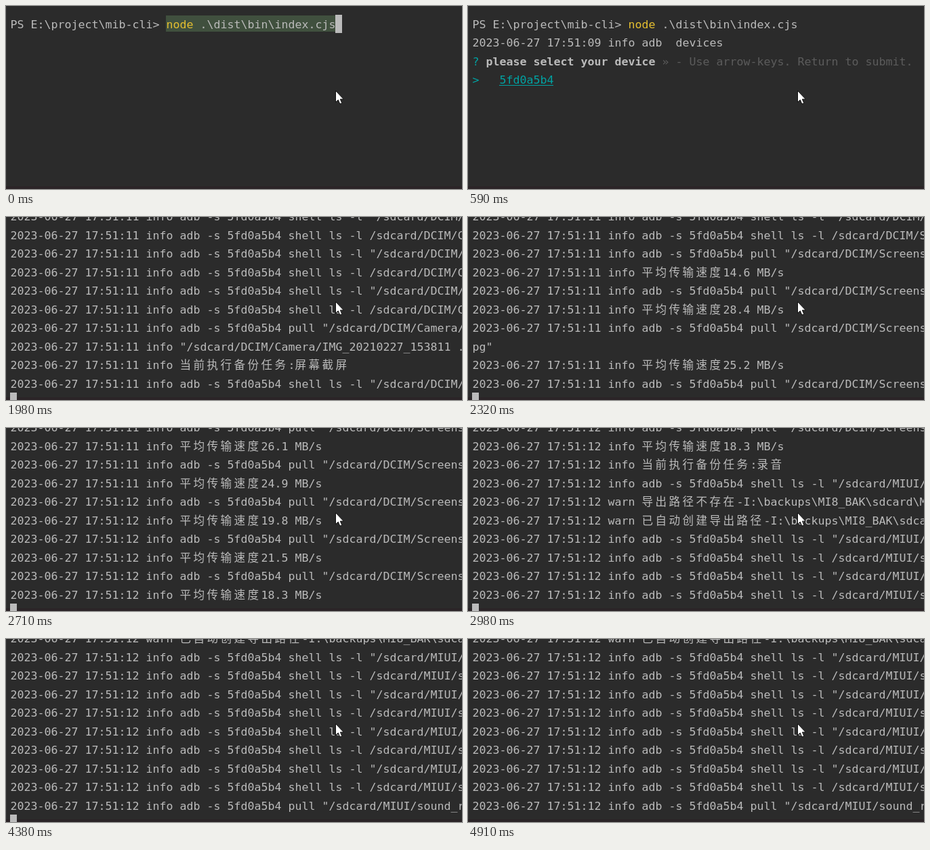
Write an HTML page with a canvas that moves like this. It is 673 by 271 pixels and loops after 5370 ms.

```html
<!DOCTYPE html>
<html lang="zh">
<head>
<meta charset="utf-8">
<style>
  html, body { margin: 0; width: 100%; height: 100%; overflow: hidden; background: #2b2b2b; }
  canvas { display: block; }
</style>
</head>
<body>
<canvas id="stage" width="673" height="271"></canvas>
<script>
const ctx = document.getElementById('stage').getContext('2d');
const LOOP = 5370, CELL = 10, PITCH = 27.5, LEFT = 6, TOP = 13, ROWS = 9;
const GREY = '#bbbbbb', DIM = '#5c5c5c', YELLOW = '#e5bf30', CYAN = '#00a3a3', GREEN = '#6f7040';
const MONO = '16.6px "DejaVu Sans Mono", monospace';
const HAN = '300 16.6px "Noto Sans CJK SC", "Noto Sans CJK", sans-serif';

// A line is a list of [text, colour, bold] segments.
const lines = [];
const add = (...segments) => lines.push(segments);
const log = (text, level = 'info') => {
  const n = lines.length;
  const second = n < 3 ? '09' : n < 4 ? '10' : n < 37 ? '11' : '12';
  add([`2023-06-27 17:51:${second} ${level} ${text}`]);
};
const adb = command => log('adb -s 5fd0a5b4 ' + command);
const list = path => adb('shell ls -l ' + path);
const listPairs = (path, count) => {
  while (count--) { list(`"${path}"`); list(path); }
};
const pull = path => adb(`pull "${path}/`);
const task = name => log('当前执行备份任务:' + name);
const speed = rate => log(`平均传输速度${rate} MB/s`);

const camera = '/sdcard/DCIM/Camera', shots = '/sdcard/DCIM/Screenshots', sound = '/sdcard/MIUI/sound_recorder';
const question = 'please select your device';

add(['PS E:\\project\\mib-cli> '], ['node', YELLOW], [' .\\dist\\bin\\index.cjs']);
log('adb  devices');
add(['√ ', GREEN], [question, GREY, true], [' » ', DIM], ['5fd0a5b4']);
log('adb  devices');
task('本地相册');
listPairs(camera, 5);
pull(camera);
log(`"${camera}/IMG_20210227_153811 .jpg"`);
task('屏幕截屏');
listPairs(shots, 3);
for (const rate of ['14.6', '28.4', '25.2', '22.7', '26.1', '24.9', '19.8', '21.5', '18.3']) {
  pull(shots);
  if (rate === '25.2') add(['pg"']);
  speed(rate);
}
task('录音');
list(`"${sound}"`);
log('导出路径不存在-I:\\backups\\MI8_BAK\\sdcard\\MIUI', 'warn');
log('已自动创建导出路径-I:\\backups\\MI8_BAK\\sdcard\\MIUI', 'warn');
listPairs(sound, 4);
pull(sound);

const menu = [
  [['? ', CYAN], [question, GREY, true], [' » - Use arrow-keys. Return to submit.', DIM]],
  [['>   5fd0a5b4', CYAN]]
];

// [time, number of lines printed]
const steps = [
  [0, 1], [260, 1], [390, 2], [1510, 6], [1580, 8], [1710, 10], [1780, 13], [1910, 15], [1980, 19],
  [2110, 21], [2180, 24], [2250, 28], [2320, 32], [2450, 36], [2500, 40],
  [2640, 42], [2710, 43], [2840, 46], [2910, 48], [2980, 51],
  [3040, 52], [3110, 53], [3240, 54], [3310, 56]
];

const rowTop = row => Math.floor(TOP + row * PITCH);

function rect(colour, x, y, w, h) {
  ctx.fillStyle = colour;
  ctx.fillRect(x, y, w, h);
}

function drawLine(segments, row) {
  let x = LEFT + 0.5;
  for (const [text, colour = GREY, bold] of segments) {
    ctx.fillStyle = colour;
    for (const char of text) {
      const wide = char > '\u2e80';
      ctx.font = wide ? HAN : (bold ? 'bold ' : '') + MONO;
      ctx.fillText(char, x, rowTop(row) + 20);
      x += wide ? 2 * CELL : CELL;
    }
  }
}

function drawPointer() {
  const arrow = new Path2D('M486.5 125.5V142.5L490.3 139L492.8 145L495.8 143.8L493.3 138H498.3Z');
  ctx.fillStyle = '#fff';
  ctx.strokeStyle = '#111';
  ctx.lineWidth = 1;
  ctx.fill(arrow);
  ctx.stroke(arrow);
}

function draw(t) {
  const count = steps.findLast(([time]) => time <= t)[1];
  const first = Math.max(0, count - ROWS);
  const typing = t < 260, choosing = t >= 590 && t < 1510;
  const blinkedOff = (t >= 3840 && t < 4380) || t >= 4910;

  rect('#2b2b2b', 0, 0, 673, 271);
  rect('#313133', 0, 0, 1, 271);
  rect('#2b2427', 0, 267, 673, 4);
  if (typing) rect('#40503e', 236, 14, 250, 24);
  for (let i = Math.max(0, first - 1); i < count; i++) drawLine(lines[i], i - first);
  if (choosing) {
    menu.forEach((line, i) => drawLine(line, count + i));
    rect(CYAN, LEFT + 4 * CELL, rowTop(3) + 22, 8 * CELL, 1);
  } else if (!blinkedOff) {
    rect(GREY, typing ? 486 : LEFT, rowTop(typing ? 0 : count - first), CELL, 27);
  }
  drawPointer();
}

const start = performance.now();
function frame() {
  draw((performance.now() - start) % LOOP);
  requestAnimationFrame(frame);
}
frame();
</script>
</body>
</html>
```
